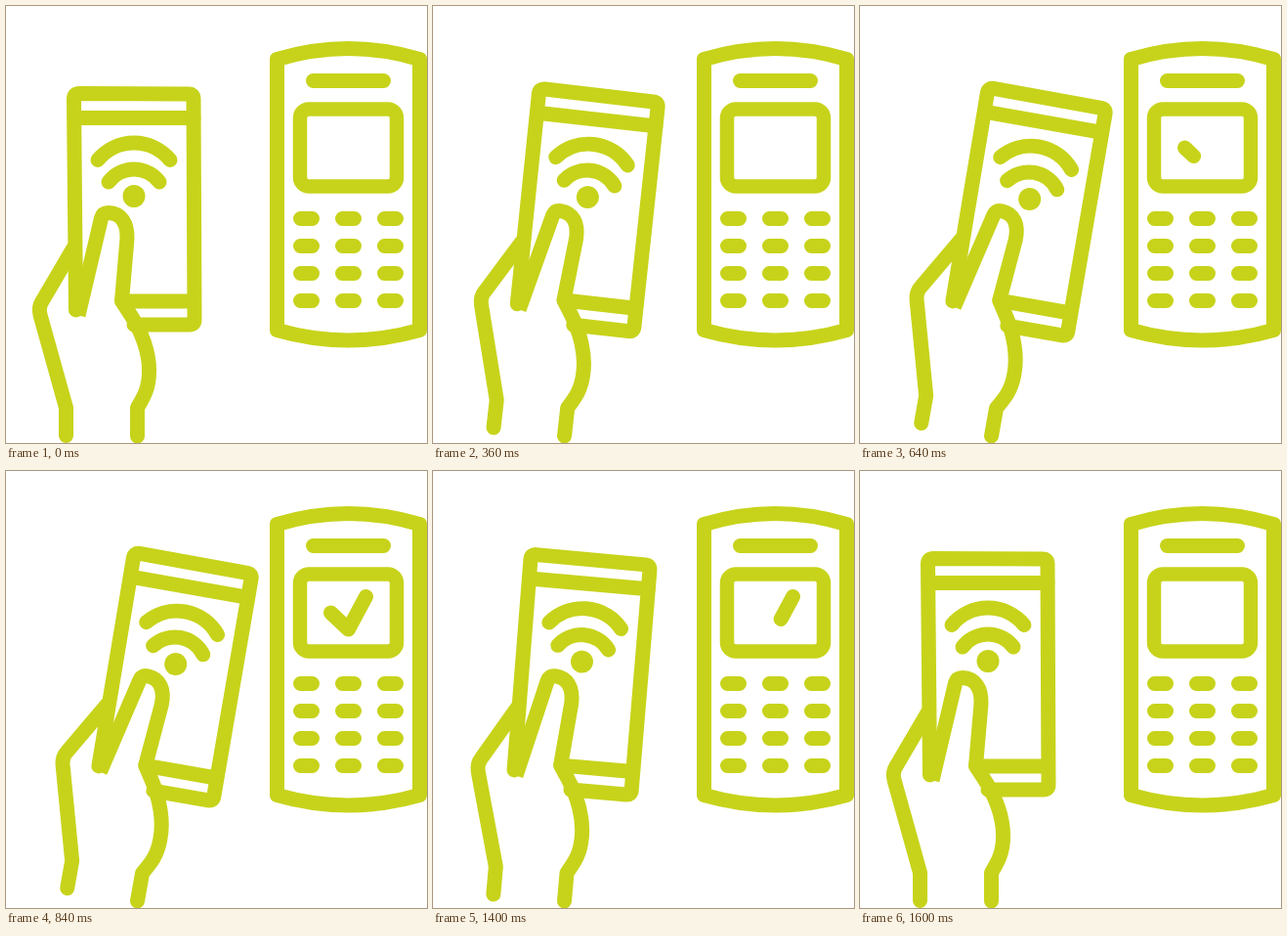
These frames come from a looping animation (431x447 px, 2000 ms). An HTML page:

```html
<!DOCTYPE html>
<html lang="en">
<head>
<meta charset="utf-8">
<title>Contactless payment</title>
<style>
  html, body { margin: 0; width: 100%; height: 100%; overflow: hidden; background: #fff; }
  svg { display: block; width: 100%; height: 100%; }
  .line { fill: none; stroke: #c7d31a; stroke-width: 15; stroke-linecap: round; stroke-linejoin: round; }
  .dot { fill: #c7d31a; stroke: none; }
</style>
</head>
<body>
<svg viewBox="0 0 431 447">
  <g class="line">
    <!-- payment terminal -->
    <path d="M277.5 54.5Q350.5 32.5 423.5 54.5V331.5Q350.5 352.5 277.5 331.5Z"/>
    <path d="M314.5 76.5H386.5"/>
    <rect x="301" y="105.5" width="99" height="79" rx="9" stroke-width="14.5"/>
    <path id="keys"/>
    <path id="check" pathLength="100" d="M332.5 145L350.5 162L368.5 128.5"/>

    <!-- hand holding the phone -->
    <g id="hand">
      <path d="M71.5 311L69.5 95Q69.5 89.5 75 89.5L187 90Q192 90 192 95L193 321Q193 326 188 326H131"/>
      <path d="M70 114.5H192M119 302H192"/>
      <path d="M94 157.5A47.9 47.9 0 0 1 168 157.5M105 180A32.5 32.5 0 0 1 157 180"/>
      <circle class="dot" cx="131" cy="194.5" r="11.5"/>
      <path stroke-linecap="butt" d="M74 316.5L97.5 217Q99 211.5 105 211.5C118 212 124.5 222 124 238L118.5 302"/>
      <path d="M69 247.5L37 302Q33 308 35 316L61.5 411V439.5"/>
      <path d="M118.5 302L127 315C139 333 147 355 146.5 374C146.5 391 141 400 134.5 411V440"/>
    </g>
  </g>
</svg>
<script>
  const LOOP = 2000, STEP = 40, TILT = 10;
  const hand = document.getElementById('hand');
  const check = document.getElementById('check');

  let keys = '';
  for (let row = 0; row < 4; row++)
    for (let col = 0; col < 3; col++)
      keys += `M${301.5 + 43 * col} ${217.5 + 28 * row}h12`;
  document.getElementById('keys').setAttribute('d', keys);

  const progress = (t, start, duration) => Math.min(1, Math.max(0, (t - start) / duration));

  function draw(now) {
    const t = Math.floor(now % LOOP / STEP) * STEP;

    const angle = TILT * (progress(t, 200, 250) - progress(t, 1234, 333));
    hand.setAttribute('transform', `rotate(${angle} 135 440)`);

    // The tick is drawn from its start, then erased from the same end.
    const from = 100 * progress(t, 1254, 250);
    const to = 100 * progress(t, 590, 250);
    check.style.display = to > from ? '' : 'none';
    check.style.strokeDasharray = `${to - from} 200`;
    check.style.strokeDashoffset = -from;
  }

  const begin = performance.now();
  function tick() {
    draw(performance.now() - begin);
    requestAnimationFrame(tick);
  }
  tick();
</script>
</body>
</html>
```
